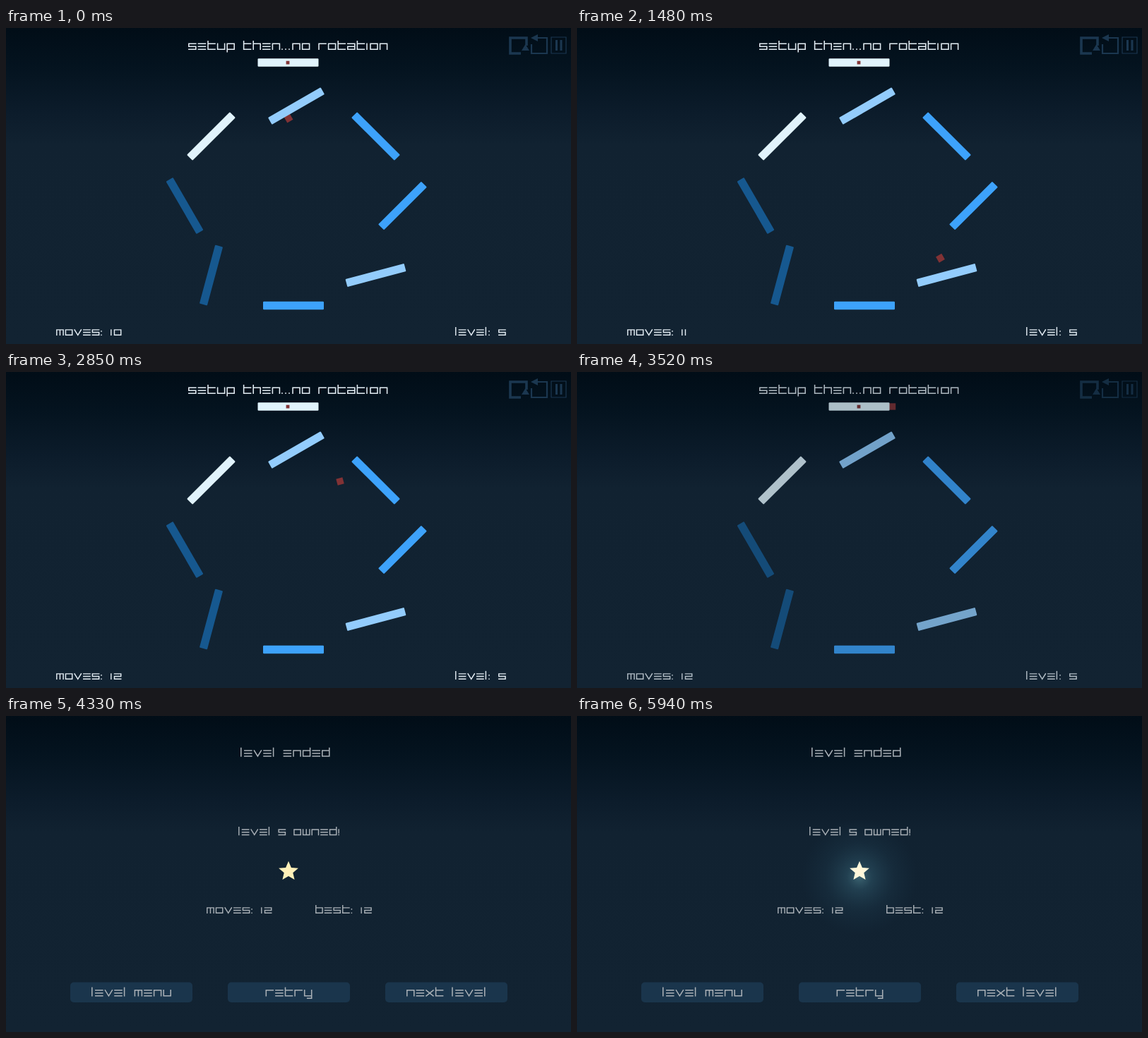
An HTML page for the animation above (5.97 s loop, 800x448 px).

```html
<!DOCTYPE html>
<html lang="en">
<head>
<meta charset="utf-8">
<title>Level 5</title>
<style>
  html, body { margin: 0; width: 100%; height: 100%; overflow: hidden; background: #122332; }
  svg { display: block; width: 800px; height: 448px; }
  text { font: 12px "DejaVu Sans", sans-serif; fill: transparent; }
  .ink { fill: none; stroke-width: 1.55; stroke-linecap: square; }
</style>
</head>
<body>
<svg id="stage" viewBox="0 0 800 448">
  <defs>
    <linearGradient id="sky" x1="0" y1="0" x2="0" y2="1">
      <stop offset="0" stop-color="#010d17"/>
      <stop offset=".12" stop-color="#04131f"/>
      <stop offset=".27" stop-color="#0c1c2b"/>
      <stop offset=".37" stop-color="#112231"/>
      <stop offset="1" stop-color="#122332"/>
    </linearGradient>
    <radialGradient id="halo">
      <stop offset="0" stop-color="#5f9aa6" stop-opacity=".55"/>
      <stop offset=".22" stop-color="#3f7488" stop-opacity=".36"/>
      <stop offset=".6" stop-color="#2c566c" stop-opacity=".16"/>
      <stop offset="1" stop-color="#234a60" stop-opacity="0"/>
    </radialGradient>
  </defs>
  <rect width="800" height="448" fill="url(#sky)"/>
  <g id="level">
    <g id="icons" fill="none" stroke="#1b3750">
      <path stroke-width="3.6" d="M729 36H714V14H737V25"/>
      <path stroke="none" fill="#1b3750" d="M735.500 23L741 32H730Z"/>
      <path stroke-width="2.200" d="M753 14H766V36H744V23"/>
      <path stroke="none" fill="#1b3750" d="M743 14L753 9V19Z"/>
      <path stroke-width="1.200" d="M772 13H793V36H772Z"/>
      <path stroke-width="3" d="M779.500 17V32M786 17V32"/>
    </g>
    <rect id="block" x="-4.700" y="-4.700" width="9.400" height="9.400" fill="#813235"/>
    <g id="bars"></g>
    <rect x="396.600" y="46.700" width="4.800" height="4.800" fill="#843638"/>
  </g>
  <g id="ending">
    <circle id="glow" cx="400" cy="228" r="82" fill="url(#halo)"/>
    <path id="star"/>
    <g id="buttons" fill="#1a354c"></g>
  </g>
</svg>
<script>
const LOOP = 5970;
const SPEED = 0.207; // px per ms
const $ = id => document.getElementById(id);

function add(parent, tag, attrs = {}) {
  const el = document.createElementNS('http://www.w3.org/2000/svg', tag);
  for (const key in attrs) el.setAttribute(key, attrs[key]);
  return parent.appendChild(el);
}

// Lettering is built from segments in a 10 by 8 cell on the baseline.
const SEGMENTS = {
  T: 'M0-8H10', M: 'M0-4H10', B: 'M0 0H10',
  a: 'M0-8V-4', b: 'M0-4V0', c: 'M10-8V-4', d: 'M10-4V0',
  A: 'M0-11.5V-8', D: 'M10-11.5V-8', P: 'M0 0V3.5',
  Q: 'M10 0V3.5H4', C: 'M5-8V0', H: 'M0-11.5V0',
  V: 'M0-8L5 0L10-8', X: 'M0-8L10 0M10-8L0 0',
  I: 'M0-8V0', '.': 'M0-.2V0', ':': 'M0-6V-5.8M0-.2V0', '!': 'M0-8V-3M0-.2V0'
};
const GLYPHS = {
  a: 'TcdBbM', b: 'AabTBcd', d: 'DcdTBab', e: 'TMB', h: 'AabTcd', i: 'I',
  l: 'H', m: 'abTcdC', n: 'abTcd', o: 'abTcdB', p: 'abTcdBP', r: 'abT',
  s: 'TaMdB', t: 'AabTB', u: 'abBcd', v: 'V', w: 'abBcdC', x: 'X', y: 'abBcdQ',
  0: 'abTcdB', 1: 'I', 2: 'TcMbB', 5: 'TaMdB', '.': '.', ':': ':', '!': '!'
};
const advance = ch => ch === ' ' ? 9.8 : 'il1.:!'.includes(ch) ? 5 : 13.6;

function label(parent, words, x, y, scale, color) {
  const g = add(parent, 'g', { transform: `translate(${x + 0.8} ${y}) scale(${scale})` });
  const write = str => {
    g.replaceChildren();
    add(g, 'text').textContent = str;
    let pen = 0;
    for (const ch of str) {
      const d = [...(GLYPHS[ch] || '')].map(s => SEGMENTS[s]).join('');
      if (d) add(g, 'path', { d, class: 'ink', stroke: color, transform: `translate(${pen} 0)` });
      pen += advance(ch);
    }
  };
  write(words);
  return write;
}

const WHITE = '#e1f3fc', LIGHT = '#93ccfc', BLUE = '#3da2fb', DARK = '#16588f';
const BARS = [
  [399.5, 49, 0, WHITE], [411, 110.5, -30, LIGHT], [290.5, 153.5, -45, WHITE],
  [523.5, 153.5, 45, BLUE], [561.5, 252, -45, BLUE], [253, 252, 60, DARK],
  [290.5, 350.5, -75, DARK], [407, 393.5, 0, BLUE], [523.5, 350.5, -15, LIGHT]
];
for (const [x, y, turn, fill] of BARS) {
  add($('bars'), 'rect', {
    x: -43, y: -5.7, width: 86, height: 11.4, rx: 1.2, fill,
    transform: `translate(${x} ${y}) rotate(${turn})`
  });
}

const BRIGHT = '#e4edf4', GRAY = '#a9b0b6';
label($('level'), 'setup then...no rotation', 258, 30.3, 1, BRIGHT);
label($('level'), 'level: 5', 636, 435.3, 0.93, BRIGHT);
const writeMoves = label($('level'), 'moves: 10', 71, 435.3, 0.93, BRIGHT);

for (const x of [91, 314, 537]) {
  add($('buttons'), 'rect', { x, y: 377.5, width: 173, height: 28.5, rx: 5 });
}
[
  ['level ended', 332, 57, 1], ['level 5 owned!', 329, 168.5, 0.93],
  ['moves: 12', 284, 279.3, 0.93], ['best: 12', 438, 279.3, 0.93],
  ['level menu', 121, 396.8, 1], ['retry', 367.5, 396.8, 1], ['next level', 567, 396.8, 1]
].forEach(args => label($('ending'), ...args, GRAY));

const corners = Array.from({ length: 10 }, (_, i) => {
  const r = i % 2 ? 6.6 : 14.6, a = Math.PI * (i / 5 - 0.5);
  return `${400 + r * Math.cos(a)} ${220.3 + r * Math.sin(a)}`;
});
$('star').setAttribute('d', `M${corners.join('L')}Z`);

// The block leaves each bar along that bar's normal.
const FLIGHTS = [
  { start: 375, from: [400, 128], turn: -30, dir: 1, length: 245.3 },
  { start: 1924, from: [522.7, 340.4], turn: -15, dir: -1, length: 301 }
];
const GOAL = { x: 446.5, y: 49, turn: 0 };

function pose(t) {
  const { start, from, turn, dir, length } = FLIGHTS[t < 1560 ? 0 : 1];
  const s = Math.max(0, t - start) * SPEED;
  if (dir < 0 && s >= length) return GOAL;
  const a = -turn * Math.PI / 180, run = dir * Math.min(s, length);
  return { x: from[0] + run * Math.sin(a), y: from[1] + run * Math.cos(a), turn };
}

const ramp = (t, a, b) => Math.min(1, Math.max(0, (t - a) / (b - a)));
let moves = 10;

function draw(t) {
  const ended = t >= 4330;
  $('ending').style.display = ended ? '' : 'none';
  $('level').style.display = ended ? 'none' : '';
  $('level').setAttribute('opacity', 1 - ramp(t, 3355, 4070));

  const { x, y, turn } = pose(t);
  $('block').setAttribute('transform', `translate(${x} ${y}) rotate(${turn})`);
  const count = 10 + FLIGHTS.filter(f => t >= f.start).length;
  if (count !== moves) writeMoves('moves: ' + (moves = count));

  const glow = ramp(t, 4330, 5940);
  $('glow').setAttribute('opacity', glow);
  $('star').setAttribute('fill', `rgb(255 ${240 + 7 * glow} ${184 + 34 * glow})`);
}

const begin = performance.now();
function tick() {
  draw((performance.now() - begin) % LOOP);
  requestAnimationFrame(tick);
}
tick();
</script>
</body>
</html>
```
